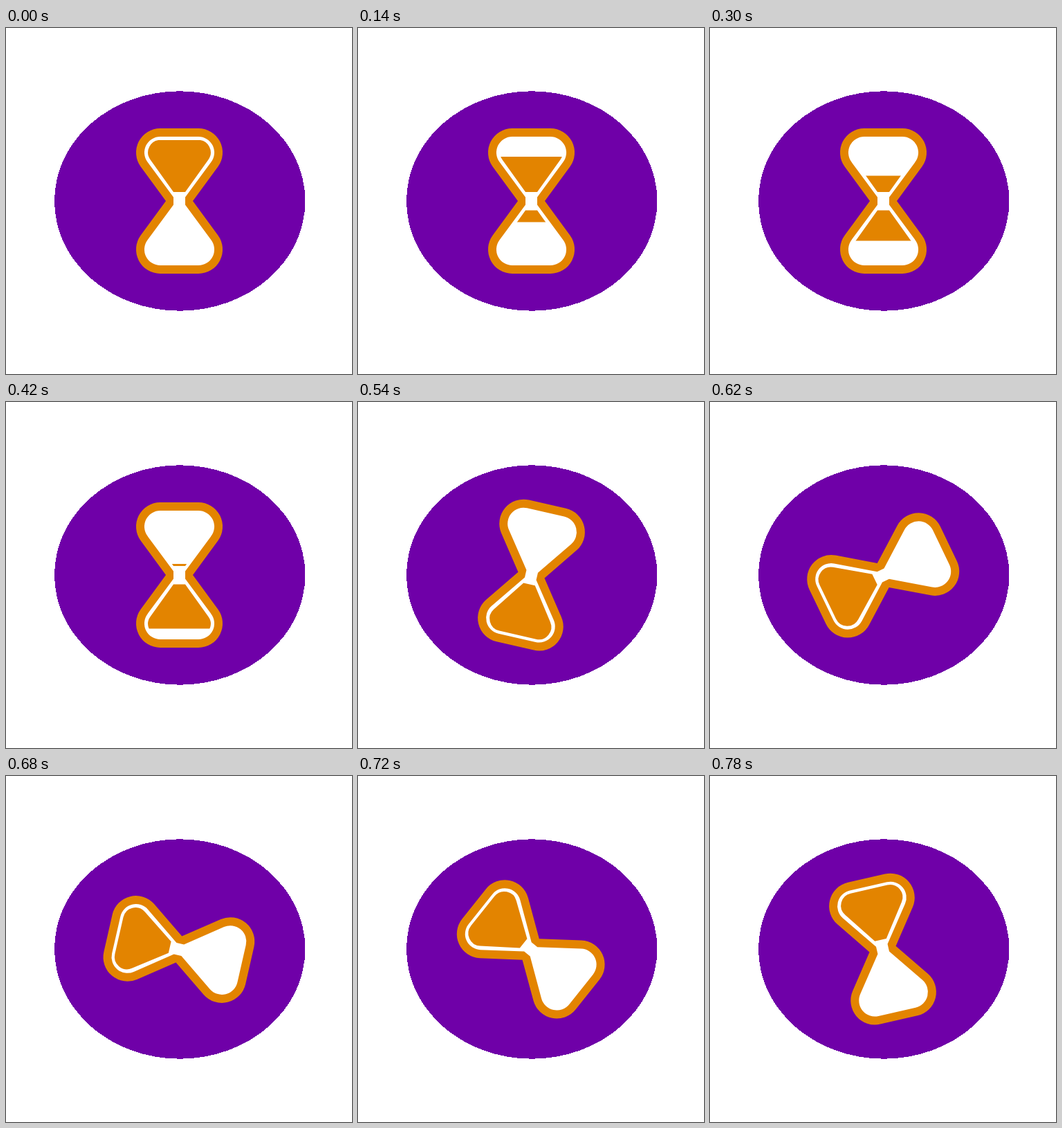
These frames come from a looping animation (500 px wide and 500 px high, 0.8 s). An HTML page:

```html
<!DOCTYPE html>
<html lang="en">
<head>
<meta charset="utf-8">
<title>Hourglass</title>
<style>
  html, body { margin: 0; width: 100%; height: 100%; overflow: hidden; background: #fff; }
  svg { display: block; width: 100vw; height: 100vh; }
</style>
</head>
<body>
<svg viewBox="0 0 500 500">
  <defs>
    <clipPath id="topClip"><rect id="topLevel" x="150" width="200"/></clipPath>
    <clipPath id="lowClip"><rect id="lowLevel" x="150" y="250" width="200"/></clipPath>
    <path id="sand" d="M223.3 161.8H277.7A18 18 0 0 1 292.3 190.4L259 237H242L208.7 190.4A18 18 0 0 1 223.3 161.8Z"/>
  </defs>
  <ellipse cx="251.2" cy="250" rx="181.2" ry="158.7" fill="#6f00a8" shape-rendering="crispEdges"/>
  <g id="glass" fill="#e38400">
    <path d="M223 145H278A35 35 0 0 1 306.3 200.6L270 250L306.3 299.4A35 35 0 0 1 278 355H223A35 35 0 0 1 194.7 299.4L231 250L194.7 200.6A35 35 0 0 1 223 145Z"/>
    <path fill="#fff" d="M223 157H278A23 23 0 0 1 296.6 193.6L259 244.5V255.5L296.6 306.4A23 23 0 0 1 278 343H223A23 23 0 0 1 204.4 306.4L242 255.5V244.5L204.4 193.6A23 23 0 0 1 223 157Z"/>
    <g clip-path="url(#topClip)"><use href="#sand"/></g>
    <g clip-path="url(#lowClip)"><use href="#sand" transform="matrix(1 0 0 -1 0 500.5)"/></g>
  </g>
</svg>
<script>
  const LOOP = 800, STEP = 20, FLOW = 500, TURN = 520;
  const get = id => document.getElementById(id);
  const glass = get('glass'), topLevel = get('topLevel'), lowLevel = get('lowLevel');

  function draw(ms) {
    const t = Math.floor((ms % LOOP) / STEP) * STEP;
    const flow = Math.min(t, FLOW);
    const top = 162 + 0.1715 * flow;
    const low = 257 + 0.168 * flow;
    const angle = 180 * Math.max(0, t - TURN) / (LOOP - TURN);
    topLevel.setAttribute('y', top);
    topLevel.setAttribute('height', Math.max(0, 250 - top));
    lowLevel.setAttribute('height', low - 250);
    glass.setAttribute('transform', `rotate(${angle} 250 250)`);
  }

  const start = performance.now();
  function tick() {
    draw(performance.now() - start);
    requestAnimationFrame(tick);
  }
  tick();
</script>
</body>
</html>
```
